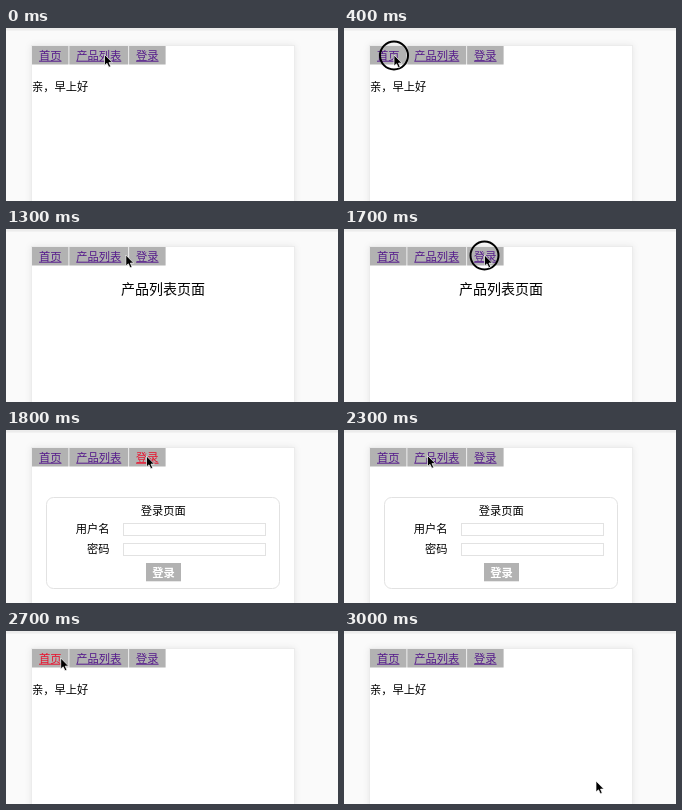
Animation of 332x173 px, one loop 3.1 s. Source, as an HTML page:

```html
<!DOCTYPE html>
<html lang="zh-CN">
<head>
<meta charset="utf-8">
<title>页面切换</title>
<style>
html, body { margin: 0; width: 100%; height: 100%; overflow: hidden; background: #fafafa; }
svg { display: block; width: 332px; height: 173px; }
text { font: 11.25px "Noto Sans CJK SC", "Noto Sans CJK", sans-serif; white-space: pre; }
.cell, .button { fill: #b2b2b2; }
.panel { fill: #fff; stroke: #ececec; filter: drop-shadow(0 0 3px rgba(0, 0, 0, .08)); }
.link { fill: #551a8b; stroke: #551a8b; }
.link.active { fill: #e8112d; stroke: #e8112d; }
.link text { stroke: none; }
.box { fill: #fff; stroke: #e2e2e2; }
.hidden { display: none; }
#list text { font-size: 14px; }
#login .go { font-weight: bold; fill: #fff; }
</style>
</head>
<body>
<svg viewBox="0 0 332 173">
  <rect width="332" height="173" fill="#fafafa"/>
  <rect width="332" height="2.5" fill="#ececec"/>
  <rect class="panel" x="25.5" y="17.5" width="263" height="170"/>
  <g id="nav"></g>

  <g id="home"><text x="26" y="63.2">亲，早上好</text></g>
  <g id="list"><text x="115" y="65.3">产品列表页面</text></g>
  <g id="login">
    <rect class="box" x="40.5" y="67.5" width="233" height="91" rx="7"/>
    <text x="134.7" y="84.5">登录页面</text>
    <text x="103.5" y="102.8" text-anchor="end">用户名</text>
    <text x="103.5" y="122.8" text-anchor="end">密码</text>
    <rect class="box" x="117.5" y="93.5" width="142" height="12"/>
    <rect class="box" x="117.5" y="113.5" width="142" height="12"/>
    <rect class="button" x="140" y="133" width="35" height="18.3"/>
    <text class="go" x="157.5" y="147" text-anchor="middle">登录</text>
  </g>

  <g id="pointer">
    <circle id="ring" cy=".5" r="14" fill="none" stroke="#000" stroke-width="2"/>
    <path d="M0 0V11L2.5 8.8L4.3 12.7L6.2 11.9L4.5 8.1H7.9Z" stroke="#fff" stroke-width=".7" stroke-linejoin="round"/>
  </g>
</svg>
<script>
const LOOP = 3100, STEP = 100, SIZE = 11.25, PAD = 7;
const $ = id => document.getElementById(id);

let left = 26;
for (const label of ['首页', '产品列表', '登录']) {
  const width = label.length * SIZE, x = left + PAD;
  $('nav').innerHTML += `
    <rect class="cell" x="${left}" y="18" width="${width + 2 * PAD}" height="18.5"/>
    <g class="link"><text x="${x}" y="31.7">${label}</text><path d="M${x} 33.2h${width}"/></g>`;
  left += width + 2 * PAD + .8;
}
const links = document.querySelectorAll('.link');
const pages = ['home', 'list', 'login'].map($);

// The pointer glides to x, y between two times, and may press a link later.
const moves = [
  { from: 100, to: 400, x: 50, y: 27, press: 400, link: 0 },
  { from: 500, to: 600, x: 94, y: 26, press: 900, link: 1 },
  { from: 1200, to: 1500, x: 140.5, y: 26, press: 1700, link: 2 },
  { from: 2000, to: 2300, x: 83.5, y: 25.5 },
  { from: 2300, to: 2600, x: 54.7, y: 27, press: 2600, link: 0 },
  { from: 2700, to: 3000, x: 252, y: 150 }
];
const easeOut = k => 1 - (1 - k) ** 2;

function draw(now) {
  const t = Math.floor(now % LOOP / STEP) * STEP;
  let x = 98.5, y = 26.5, page = 0, active = -1, pressed = false;
  for (const m of moves) {
    if (t < m.from) break;
    const k = easeOut(Math.min(1, (t - m.from) / (m.to - m.from)));
    x += (m.x - x) * k;
    y += (m.y - y) * k;
    if (t === m.press) pressed = true;
    if (t === m.press + STEP) active = m.link;
    if (t > m.press) page = m.link;
  }
  pages.forEach((el, i) => el.classList.toggle('hidden', i !== page));
  links.forEach((el, i) => el.classList.toggle('active', i === active));
  $('ring').classList.toggle('hidden', !pressed);
  $('pointer').setAttribute('transform', `translate(${x} ${y})`);
}

const start = performance.now();
function tick() {
  draw(performance.now() - start);
  requestAnimationFrame(tick);
}
tick();
</script>
</body>
</html>
```
